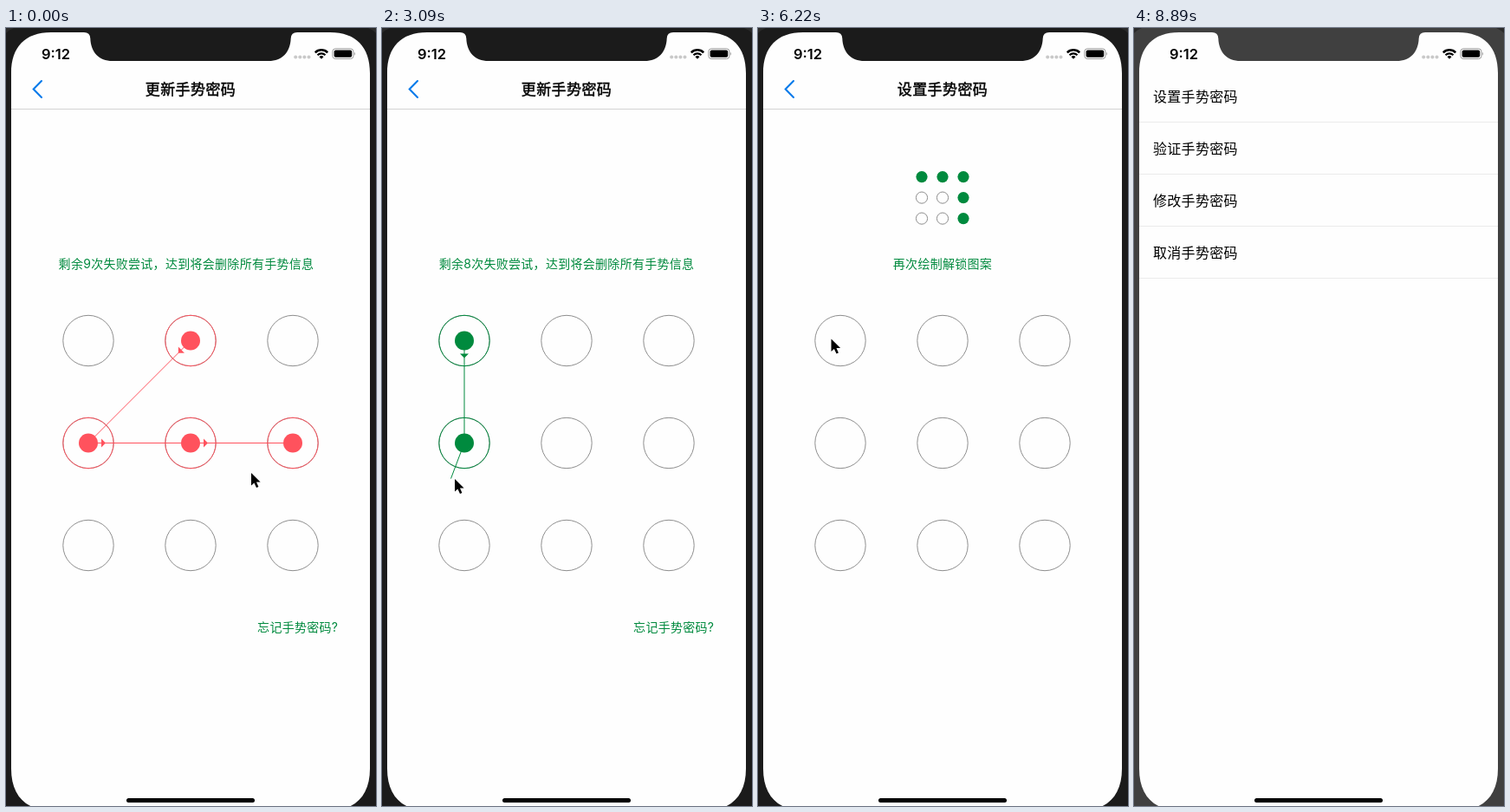
Write an HTML page that moves like this. It is 427 px wide and 897 px high and loops after 8990 ms.

```html
<!DOCTYPE html>
<html lang="zh-CN">
<head>
<meta charset="utf-8">
<title>手势密码</title>
<style>
  html, body { margin: 0; width: 100%; height: 100%; overflow: hidden; background: #2a2a2a; }
  svg { display: block; width: 427px; height: 897px; }
  text { font: 400 14px Inter, "Noto Sans CJK SC", "Noto Sans CJK", sans-serif; letter-spacing: .29px; }
  .mid { text-anchor: middle; }
  .title { font-size: 17px; letter-spacing: .4px; stroke: #000; stroke-width: .45px; }
  .row { font-size: 16px; letter-spacing: .3px; }
  .green { fill: #008a3e; }
  .clock { font-size: 16.5px; font-weight: 600; letter-spacing: 0; }
  .ring { fill: none; stroke: #8e8e8e; stroke-width: 1; }
  #gesture { stroke-width: 1; }
  #gesture .line { fill: none; }
  #gesture .solid { stroke: none; }
</style>
</head>
<body>
<svg viewBox="0 0 427 897" xmlns="http://www.w3.org/2000/svg">
  <rect x="6" y="5" width="414" height="897" fill="#fefefe"/>
  <g id="list"></g>

  <g id="sheet">
    <rect x="6" y="5" width="414" height="897" fill="#fefefe"/>
    <path d="M41 61L31.7 70.5L41 80" fill="none" stroke="#0a7bea" stroke-width="2.1" stroke-linecap="round"/>
    <text id="title" class="title mid" x="213" y="77.3"></text>
    <path d="M6 93.5H420" stroke="#d3d3d3"/>
    <g id="preview"></g>
    <text id="hint" class="green mid" x="213" y="276.7"></text>
    <g id="rings"></g>
    <g id="gesture"></g>
    <text id="forgot" class="green mid" x="336.7" y="695.7">忘记手势密码?</text>
  </g>

  <text class="clock" x="41" y="35.6">9:12</text>
  <g fill="#c9c9c9">
    <circle cx="334.2" cy="33.5" r="2"/><circle cx="339.3" cy="33.5" r="2"/>
    <circle cx="344.4" cy="33.5" r="2"/><circle cx="349.5" cy="33.5" r="2"/>
  </g>
  <g fill="none" stroke="#000">
    <path d="M356.8 28.3a10.2 10.2 0 0 1 14.4 0" stroke-width="2.4"/>
    <path d="M359.5 31.3a6.4 6.4 0 0 1 9 0" stroke-width="2.2"/>
    <path d="M364 35.8l-2.5-2.5a3.6 3.6 0 0 1 5 0z" fill="#000" stroke="none"/>
  </g>
  <rect x="376.9" y="23.9" width="24" height="11.6" rx="3.2" fill="none" stroke="#9a9a9a"/>
  <rect x="378.6" y="25.6" width="20.6" height="8.2" rx="1.8"/>
  <path d="M402 27.8q1.8 1.8 0 4z" fill="#9a9a9a"/>
  <rect x="139" y="888" width="148" height="5" rx="2.5"/>

  <path id="bezel" fill-rule="evenodd" d="
    M-6 920V21A22 22 0 0 1 16 -1H411A22 22 0 0 1 433 21V920Z
    M6 52V854C6 884 22 902 52 902H374C404 902 420 884 420 854V52C420 22 404 5 374 5
    H336Q329 5 328.7 12C328 28 319 38 303 38H123C107 38 98 28 97.3 12Q97 5 90 5
    H52C22 5 6 22 6 52Z"/>

  <path id="cursor" d="M0 0V14.6L3.4 11.4L6 17L8.4 16L6 10.5H10.6Z"
    fill="#000" stroke="#fff" stroke-width="1.2" paint-order="stroke"/>
</svg>

<script>
const LOOP = 8990, STEP = 148;
const GREEN = '#008a3e', RED = '#ff525d';
const $ = id => document.getElementById(id);
const spot = i => [95 + i % 3 * 118, 360.5 + Math.floor(i / 3) * 118];

// hits: step at which each node of the path is reached
const gestures = [
  { path: [1, 3, 4, 5], hits: [0, 0, 0, 0], end: 0, clear: 3, fail: true },
  { path: [0, 3, 4], hits: [4, 6, 8], end: 9, clear: 12, fail: true },
  { path: [0, 3, 6, 7, 8], hits: [19, 20, 21, 23, 24], end: 25, clear: 26 },
  { path: [0, 1, 2, 5, 8], hits: [34, 35, 36, 38, 39], end: 39, clear: 40 },
  { path: [0, 1, 2, 5, 8], hits: [43, 44, 45, 47, 48], end: 48, clear: 49 }
];

// pointer stops: step, x, y
const corner = k => [[k, 110, 360], [k + 1, 218, 359], [k + 2, 328, 361], [k + 5, 332, 597]];
const stops = [
  [0, 283, 513], [4, 90, 362], [6, 90, 482], [8, 215, 484], [9, 256, 499],
  [16, 87, 351], [17, 82, 350], [18, 82, 350], [19, 86, 366], [20, 84, 520],
  [21, 65.5, 643.5], [22, 130, 640], [23, 225, 618], [24, 325, 604], [25, 357, 606],
  [27, 369.5, 608], [33, 85, 358], ...corner(34), [40, 325, 592], [42, 84.5, 358.5],
  ...corner(43), [49, 328, 593], [51, 313.5, 587.5], [56, 348, 829], [58, 394, 885]
];

function pointer(k) {
  const i = stops.findIndex(s => s[0] > k);
  if (i < 0) return stops[stops.length - 1].slice(1);
  const [a, x, y] = stops[i - 1], [b, u, v] = stops[i];
  const p = (k - a) / (b - a);
  return [x + (u - x) * p, y + (v - y) * p];
}

function drawGesture(k, tip) {
  const g = gestures.find(g => k >= g.hits[0] && k < g.clear);
  if (!g) return '';
  const color = g.fail && k >= g.end ? RED : GREEN;
  const nodes = g.path.filter((n, i) => g.hits[i] <= k).map(spot);
  const ends = k < g.end ? [...nodes, [tip[0] - 4.5, tip[1] - .5]] : nodes;
  let out = `<path class="line" d="M${ends.join('L')}"/>`;
  nodes.forEach(([x, y], i) => {
    out += `<circle class="line" cx="${x}" cy="${y}" r="29.2"/>
      <circle class="solid" cx="${x}" cy="${y}" r="11"/>`;
    const next = nodes[i + 1];
    if (!next) return;
    const angle = Math.atan2(next[1] - y, next[0] - x) * 180 / Math.PI;
    out += `<path class="solid" d="M15 -5L20 0L15 5Z" transform="translate(${x} ${y}) rotate(${angle})"/>`;
  });
  return `<g stroke="${color}" fill="${color}">${out}</g>`;
}

function drawPreview(k) {
  if (k < 26) return '';
  const filled = k < 40 ? [0, 3] : [0, 1, 2, 5, 8];
  return Array.from({ length: 9 }, (_, i) => {
    const on = filled.includes(i);
    return `<circle class="${on ? 'green' : 'ring'}" r="6.6"
      cx="${189 + i % 3 * 24}" cy="${171.6 + Math.floor(i / 3) * 24}"/>`;
  }).join('');
}

function hintAt(k) {
  if (k >= 40) return '再次绘制解锁图案';
  if (k >= 26) return '设置手势密码';
  return `剩余${k < 9 ? 9 : 8}次失败尝试，达到将会删除所有手势信息`;
}

function sheetOffset(k) {
  if (k < 50) return 0;
  return k < 51 ? 540 : k < 52 ? 789 : 900;
}

function render(k) {
  const tip = pointer(k);
  const shake = k === 0 ? -5 : k === 9 ? 4 : 0;
  $('title').textContent = k < 26 ? '更新手势密码' : '设置手势密码';
  $('hint').textContent = hintAt(k);
  $('hint').setAttribute('x', 213 + shake);
  $('forgot').style.display = k < 26 ? '' : 'none';
  $('preview').innerHTML = drawPreview(k);
  $('gesture').innerHTML = drawGesture(k, tip);
  $('sheet').setAttribute('transform', `translate(0 ${sheetOffset(k)})`);
  $('bezel').setAttribute('fill', k < 60 ? '#1b1b1b' : '#404040');
  $('cursor').setAttribute('transform', `translate(${tip})`);
  $('cursor').style.display = k < 58 ? '' : 'none';
}

$('rings').innerHTML = Array.from({ length: 9 }, (_, i) => {
  const [x, y] = spot(i);
  return `<circle class="ring" cx="${x}" cy="${y}" r="29.2"/>`;
}).join('');

$('list').innerHTML = ['设置', '验证', '修改', '取消'].map((verb, i) =>
  `<text class="row" x="22" y="${85 + i * 60}">${verb}手势密码</text>
   <path d="M6 ${108.5 + i * 60}H420" stroke="#ebebeb"/>`).join('');

let shown = -1;
function tick() {
  const t = performance.now() % LOOP;
  const k = t >= 8890 ? 60 : Math.min(58, Math.floor((t + 10) / STEP));
  if (k !== shown) render(shown = k);
  requestAnimationFrame(tick);
}
tick();
</script>
</body>
</html>
```
